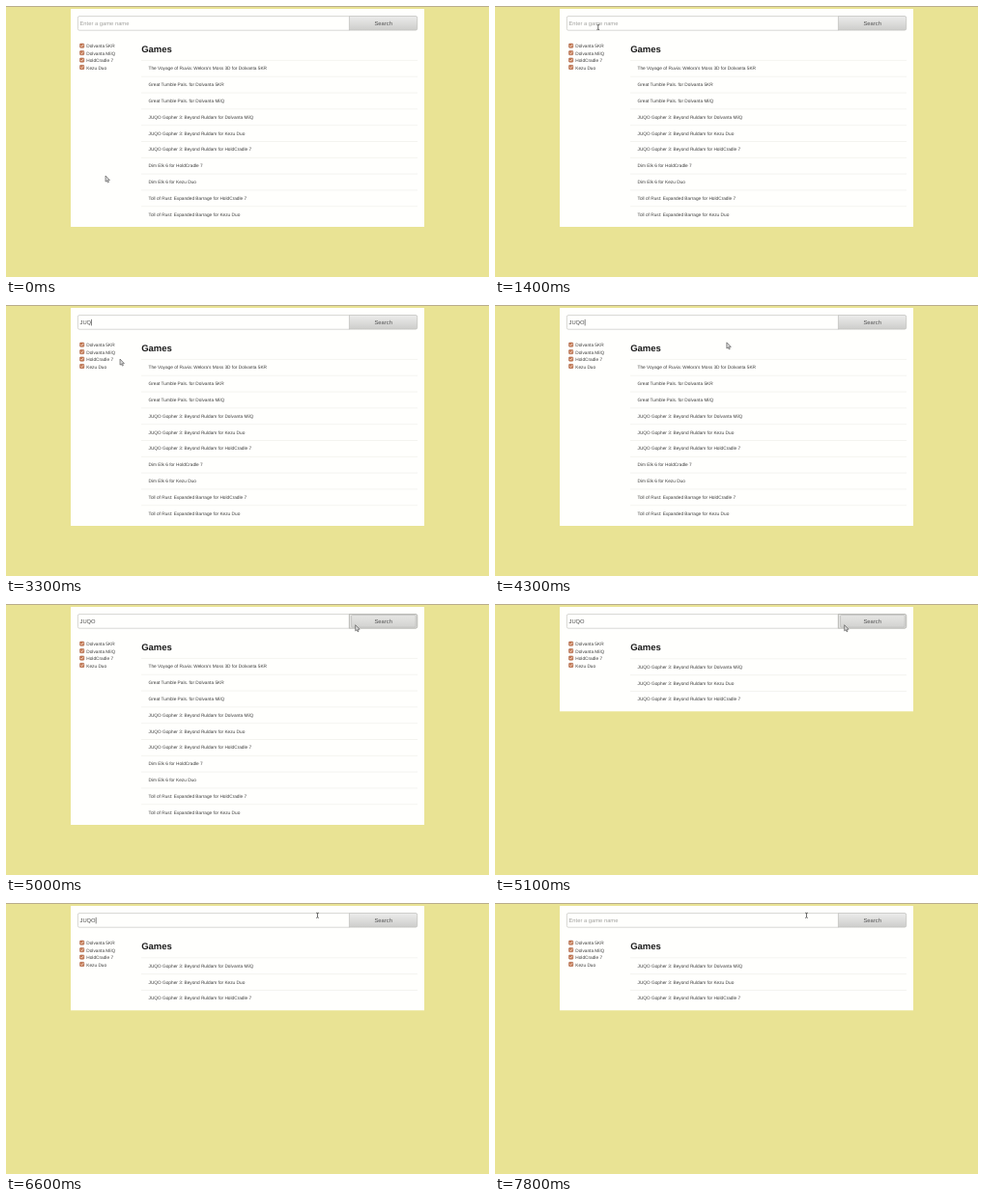
Write an HTML page that moves like this. It is 500 px wide and 281 px high and loops after 8 s.

```html
<!DOCTYPE html>
<html lang="en">
<head>
<meta charset="utf-8">
<title>Game search</title>
<style>
html, body { margin: 0; width: 100%; height: 100%; overflow: hidden; background: #e9e394; }
svg { display: block; width: 100vw; height: 100vh; }
text { font-family: "Liberation Sans", Arial, sans-serif; text-rendering: geometricPrecision; white-space: pre; }
.small { font-size: 4.75px; fill: #3c3c3c; }
.field { font-size: 5.8px; }
</style>
</head>
<body>
<svg viewBox="0 0 500 281" xmlns="http://www.w3.org/2000/svg">
  <defs>
    <linearGradient id="face" x2="0" y2="1">
      <stop stop-color="#ececeb"/><stop offset="1" stop-color="#cdcdcb"/>
    </linearGradient>
    <linearGradient id="pressed" x2="0" y2="1">
      <stop stop-color="#e6e6e4"/><stop offset="1" stop-color="#d2d2d0"/>
    </linearGradient>
  </defs>
  <rect width="500" height="281" fill="#e9e394"/>
  <rect width="500" height="1" fill="#b9ad8c"/>
  <rect id="panel" x="67" y="3" width="366" height="226" fill="#fffffd"/>

  <rect x="74.4" y="10.6" width="282" height="14.6" rx="1.5" fill="#fffffd" stroke="#c6c6c2" stroke-width=".7"/>
  <text id="query" class="field" x="76.5" y="20.1"></text>
  <rect id="caret" y="14.8" width=".6" height="6.6" fill="#333"/>

  <path d="M355.4 10.5H424a1.7 1.7 0 0 1 1.7 1.7V23.4a1.7 1.7 0 0 1 -1.7 1.7H355.4Z" fill="url(#face)" stroke="#bdbdba" stroke-width=".7"/>
  <g id="press">
    <path d="M355.4 10.5H424a1.7 1.7 0 0 1 1.7 1.7V23.4a1.7 1.7 0 0 1 -1.7 1.7H355.4Z" fill="#e4e4e2" stroke="#b0b0ad" stroke-width=".7"/>
    <rect x="357.6" y="11.6" width="66.6" height="12.6" rx="1" fill="url(#pressed)" stroke="#b4b4b1" stroke-width=".6"/>
  </g>
  <text class="field" x="390.7" y="20.1" text-anchor="middle" fill="#555">Search</text>

  <text x="140.2" y="47.6" font-size="9.5" font-weight="bold" fill="#1c1c1c">Games</text>
  <g id="filters"></g>
  <g id="all"></g>
  <g id="found"></g>

  <path id="arrow" d="M0 0V6.2L1.4 5L2.4 7.1L3.4 6.6L2.5 4.6H4.4Z" fill="#d9d9d9" stroke="#4a4a4a" stroke-width=".6"/>
  <path id="beam" d="M-1.3 -2.6Q0 -2.6 0 -1.8Q0 -2.6 1.3 -2.6M0 -1.9V1.9M-1.3 2.6Q0 2.6 0 1.8Q0 2.6 1.3 2.6" fill="none" stroke="#333" stroke-width=".7"/>
</svg>
<script>
const $ = id => document.getElementById(id);
const LOOP = 8000, STEP = 100, WORD = "JUQO";
const HINT = "Enter a game name";

const systems = ["Dolvanta 5KR", "Dolvanta MilQ", "HoldCradle 7", "Kezu Duo"];
const [handheld, home, cradle, duo] = systems;
const heroes = WORD + " Gopher 3: Beyond Ruldam";
const games = [
  ["The Voyage of Ruvia: Welora's Moss 3D", handheld],
  ["Great Tumble Pals.", handheld],
  ["Great Tumble Pals.", home],
  [heroes, home], [heroes, duo], [heroes, cradle],
  ["Dim Elk 6", cradle], ["Dim Elk 6", duo],
  ["Toll of Rust: Expanded Barrage", cradle],
  ["Toll of Rust: Expanded Barrage", duo]
].map(([name, system]) => name + " for " + system);

function add(parent, tag, attrs, content) {
  const el = document.createElementNS("http://www.w3.org/2000/svg", tag);
  for (const key in attrs) el.setAttribute(key, attrs[key]);
  if (content) el.textContent = content;
  parent.appendChild(el);
}

function fillList(group, list, shift) {
  list.forEach((name, i) => {
    const y = 66.3 + shift + i * 16.82;
    add(group, "path", { d: `M140 ${y - 9.9}H426`, stroke: "#ededE8", "stroke-width": 0.6 });
    add(group, "text", { class: "small", x: 147.5, y }, name);
  });
}

systems.forEach((name, i) => {
  const y = 39 + i * 7.45, g = $("filters");
  add(g, "rect", { x: 76.5, y, width: 4.3, height: 4.3, rx: 0.7, fill: "#c47852", stroke: "#a45f42", "stroke-width": 0.5 });
  add(g, "path", { d: `M77.4 ${y + 2.1}l1 1.1l1.7 -2.3`, fill: "none", stroke: "#fff4ea", "stroke-width": 0.7 });
  add(g, "text", { class: "small", x: 83.3, y: y + 4.4 }, name);
});
fillList($("all"), games, 0);
fillList($("found"), games.filter(name => name.startsWith(WORD)), 0.4);

// Pointer moves: start, end, x, y
const home0 = [103, 176];
const moves = [
  [800, 1400, 106.8, 22],
  [1700, 2000, 118, 56],
  [3900, 4700, 361.7, 21.7],
  [6000, 6500, 322.5, 12.8]
];
// Typed length from each time on
const typing = [[0, 0], [2700, 1], [2900, 2], [3200, 3], [3900, 4], [6900, 3], [7100, 2], [7300, 1], [7600, 0]];

function pointer(t) {
  let [x, y] = home0;
  for (const [start, end, toX, toY] of moves) {
    const p = Math.min(1, Math.max(0, (t - start) / (end - start)));
    const e = p * p * (3 - 2 * p);
    x += (toX - x) * e;
    y += (toY - y) * e;
  }
  return [x, y];
}

const show = (id, on) => $(id).setAttribute("visibility", on ? "visible" : "hidden");

function draw(time) {
  const t = Math.floor((time % LOOP) / STEP) * STEP;
  const [x, y] = pointer(t);
  const count = typing.filter(([at]) => at <= t).pop()[1];
  const searched = t >= 5100;
  const query = $("query");

  query.textContent = count ? WORD.slice(0, count) : HINT;
  query.setAttribute("fill", count ? "#4a4a4a" : "#a3a3a0");
  $("caret").setAttribute("x", 76.7 + (count ? query.getComputedTextLength() : 0));
  show("caret", count && (t < 5000 || t >= 6500));

  show("press", t >= 5000 && x > 356);
  show("all", !searched);
  show("found", searched);
  $("panel").setAttribute("height", searched ? 108.3 : 226);

  const overField = x > 74 && x < 355 && y > 10 && y < 25.5;
  show("arrow", !overField);
  show("beam", overField);
  for (const id of ["arrow", "beam"]) $(id).setAttribute("transform", `translate(${x} ${y})`);
}

const began = performance.now();
function tick() {
  draw(performance.now() - began);
  requestAnimationFrame(tick);
}
tick();
</script>
</body>
</html>
```
